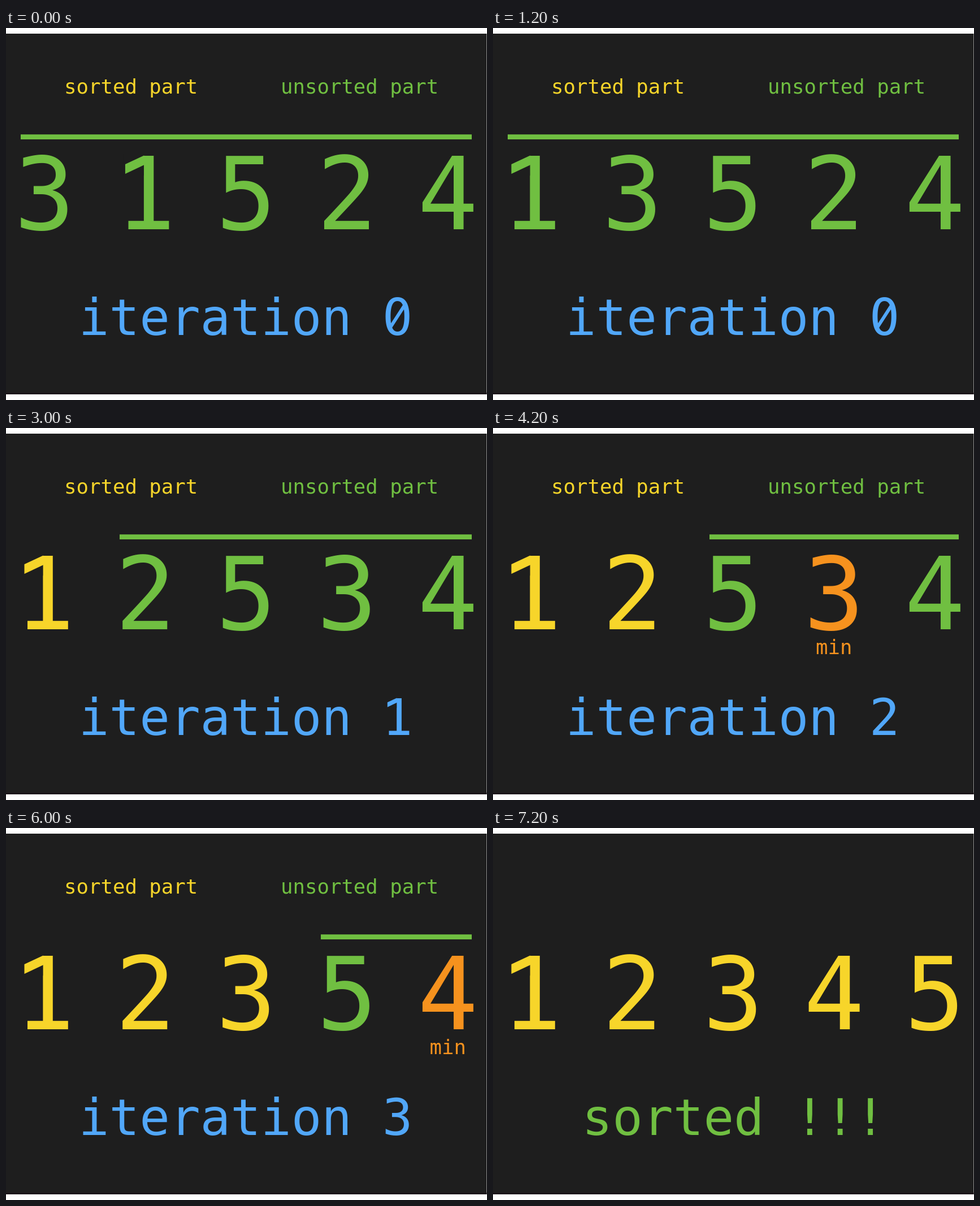
These frames come from a looping animation (851x658 px, 7800 ms). An HTML page:

```html
<!DOCTYPE html>
<html lang="en">
<head>
<meta charset="utf-8">
<title>Selection sort</title>
<style>
  html, body { margin: 0; width: 100%; height: 100%; overflow: hidden; background: #fff; }
  svg { display: block; width: 851px; height: 658px; font-family: "DejaVu Sans Mono", monospace; }
</style>
</head>
<body>
<svg viewBox="0 0 851 658">
  <rect y="10" width="850.5" height="638" fill="#1e1e1e"/>
  <rect y="644.5" width="850.5" height="3.5" fill="#1c171a"/>
  <g id="scene"></g>
</svg>
<script>
const STEP = 600, STEPS = 13;
const BG = '#1e1e1e', YELLOW = '#f7d52a', GREEN = '#70bf41', ORANGE = '#f6921e', BLUE = '#51a7f9';
const BIG = 178.4, MEDIUM = 89.2, SMALL = 35.68, ADVANCE = 0.602;
const LINE_START = [26, 201, 383, 557];
const scene = document.getElementById('scene');

const text = (str, x, y, size, color) =>
  `<text x="${x}" y="${y}" font-size="${size}" fill="${color}">${str}</text>`;

// Details in em units: a steep flag for the one, a slash for the zero.
const details = {
  1: color => `<path fill="${BG}" d="M.08-.75H.285V-.53H.08z"/>
    <path fill="${color}" d="M.101-.642L.287-.729L.3-.641L.101-.5465z"/>`,
  0: color => `<ellipse cx=".301" cy="-.365" rx=".11" ry=".19" fill="${BG}"/>
    <path stroke="${color}" stroke-width=".066" d="M.165-.155L.437-.575"/>`
};

function detail(digit, x, y, size, color) {
  const draw = details[digit];
  return draw ? `<g transform="translate(${x} ${y}) scale(${size})">${draw(color)}</g>` : '';
}

const digit = (d, x, y, size, color) => text(d, x, y, size, color) + detail(d, x, y, size, color);

function render(step) {
  const done = step === STEPS - 1;
  const round = Math.floor(step / 3), phase = step % 3;
  const values = [3, 1, 5, 2, 4];
  const minFrom = i => values.indexOf(Math.min(...values.slice(i)));
  const swapMin = i => {
    const m = minFrom(i);
    [values[i], values[m]] = [values[m], values[i]];
  };
  for (let i = 0; i < round; i++) swapMin(i);
  const min = !done && phase === 1 ? minFrom(round) : -1;
  if (!done && phase === 2) swapMin(round);

  let out = '';
  values.forEach((value, i) => {
    const x = 14.5 + i * BIG;
    const color = done || i < round ? YELLOW : i === min ? ORANGE : GREEN;
    out += digit(value, x, 355.5, BIG, color);
    if (i === min) out += text('min', x + 21.4, 400, SMALL, ORANGE);
  });

  if (done) {
    out += text('sorted !!!', 157.6, 542.5, MEDIUM, GREEN);
  } else {
    const x = 128.8;
    out += text('sorted part', 103, 116, SMALL, YELLOW)
      + text('unsorted part', 486, 116, SMALL, GREEN)
      + `<path fill="${GREEN}" d="M${LINE_START[round]} 188.2H824V197H${LINE_START[round]}z"/>`
      + text('iteration ' + round, x, 542.5, MEDIUM, BLUE)
      + detail(round, x + 10 * ADVANCE * MEDIUM, 542.5, MEDIUM, BLUE);
  }
  scene.innerHTML = out;
}

let shown = -1;
const start = performance.now();
function tick() {
  const step = Math.floor((performance.now() - start) / STEP) % STEPS;
  if (step !== shown) render(shown = step);
  requestAnimationFrame(tick);
}
tick();
</script>
</body>
</html>
```
